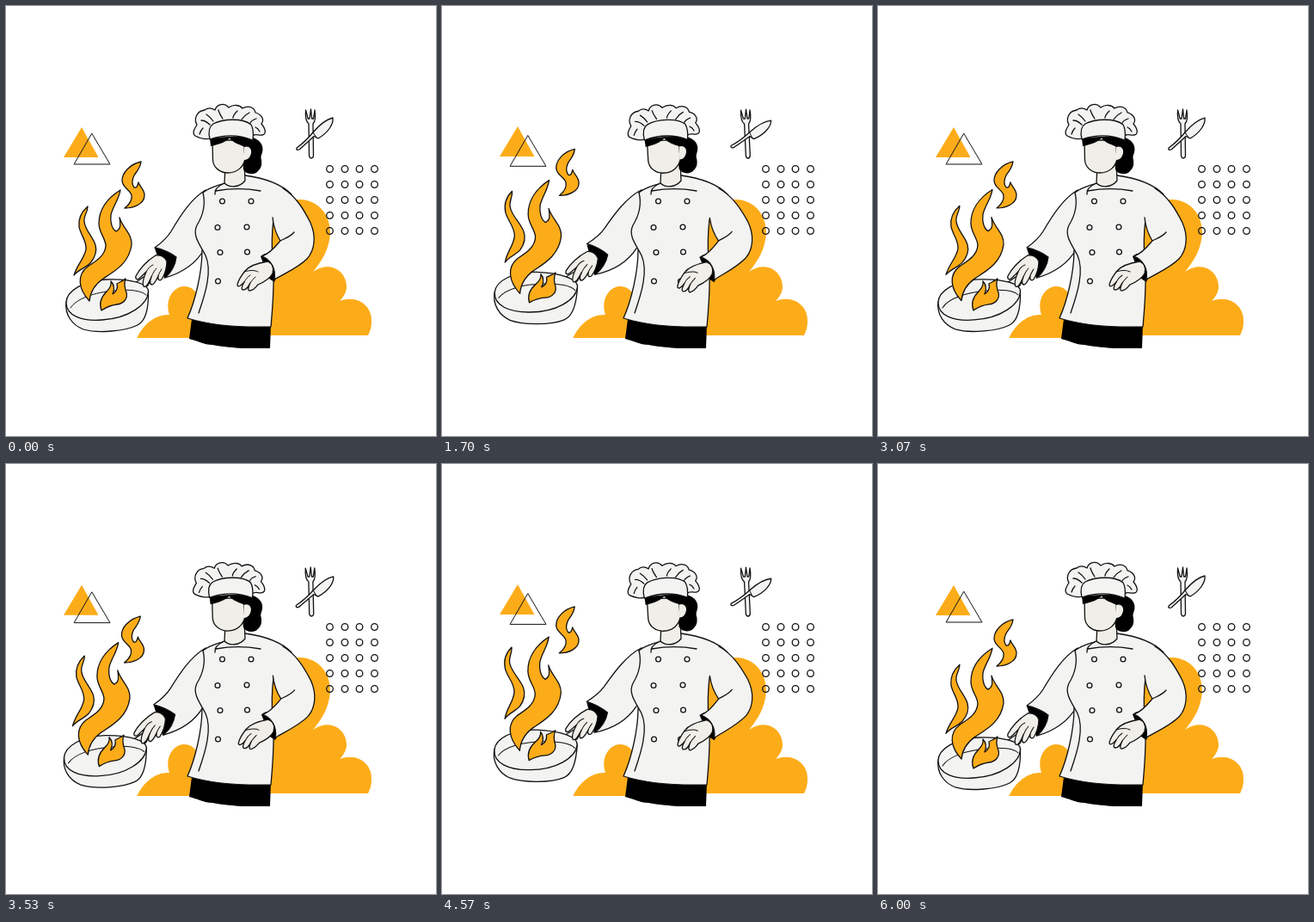
Write an HTML page that moves like this. It is 500 px wide and 500 px high and loops after 6030 ms.

```html
<!DOCTYPE html>
<html lang="en">
<head>
<meta charset="utf-8">
<title>Chef with flaming pan</title>
<style>
html, body { margin: 0; width: 100%; height: 100%; overflow: hidden; background: #fff; }
svg { display: block; width: 100vw; height: 100vh; }
.o { fill: #fdac19; }
.w { fill: #f3f3f2; }
.n { fill: none; }
.skin { fill: #f0eee8; }
.k { fill: #000; }
.l { stroke: #111; stroke-width: 1.3; stroke-linejoin: round; stroke-linecap: round; }
.thin { stroke-width: 1; }
</style>
</head>
<body>
<svg viewBox="0 0 500 500">
  <!-- cloud -->
  <path class="o" d="M152.500 386C158 373 172 358 190 359C184 341 195 326 207 326C216 326 222 332 224 340L300 340L305 245C312 232 326 225 342 225C364 226 377 243 377 264C376 283 367 297 357 309C376 295 397 308 396 328C395 335 391 340 388 343C410 335 426 350 425 367C425 374 423 379 421 383H260V386Z"/>

  <path id="triFill" class="o" d="M88 141L107.500 176H67Z"/>
  <path id="triLine" class="n l thin" d="M100 148.500L121 184H79.500Z"/>
  <g id="dots" class="n l"></g>

  <g id="fork">
    <path class="w l" d="M348.500 121C348 128 348 134 352 137L352.500 174C353 178 357 178 357.500 174L357 137C360 134 360 128 359 121L357.500 131H355.700L354.500 120L353 131H351.200Z"/>
  </g>
  <g id="knife">
    <path class="w l" d="M338 165C345 160 352 153 357 147C363 140 371 132 380 130C381 137 375 147 363 154L358 151.500C353 156 347 162 341 167C339 168 337 167 338 165Z"/>
    <path class="n l thin" d="M357 147L361 153"/>
  </g>

  <!-- trousers -->
  <path class="k" d="M216 364L213 387C222 389 230 394 240 394C255 397 265 397 274 398L307 398L308 370Z"/>

  <!-- pan arm -->
  <g id="panArm">
    <path class="w l" d="M150 322L163 313L170 314L165 325L156 331Z"/>
    <path class="w l" d="M70 344C68 359 77 371 90 376C107 381 139 378 153 371C163 366 166 350 165.500 331Z"/>
    <path class="w l" d="M70 345C70 331 91 319 117 318C146 317 166 323 165.500 332C165 347 143 363 112 365C88 367 70 360 70 345Z"/>
    <path class="n l thin" d="M75 351C82 340 103 333 126 331C144 329 158 331 163 336"/>
    <path class="o l" d="M111 354C108 346 111 338 117 332C121 328 123 325 122 320C126 324 126 330 124 335C129 332 130 327 129 323C132 321 136 320 139 317C137 323 138 328 140 333C142 340 137 346 129 347C121 348 117 350 111 354Z"/>
  </g>
  <path id="flameBig" class="o l" d="M133 214C117 224 108 238 108 253C108 264 116 270 116 279C115 291 104 297 95 303C82 313 84 329 97 343C98 332 103 324 113 317C127 308 143 299 146 278C147 265 136 259 132 246C133 254 134 259 128 262C123 259 121 251 122 243C124 233 131 226 133 214Z"/>
  <path id="flameLeft" class="o l" d="M95 233C87 240 84 249 85 257C87 267 94 273 93 283C91 294 83 300 79 313C85 306 92 305 98 299C103 293 106 285 104 278C101 268 92 261 91 251C90 244 95 240 95 233Z"/>
  <path id="flameTop" class="o l" d="M157 181C144 184 135 194 135 203C135 211 144 213 146 220C147 227 142 232 138 235C149 235 161 230 161 220C161 213 155 210 154 205C153 209 152 212 149 211C146 207 147 201 149 197C152 192 156 189 157 181Z"/>
  <g id="arm">
    <path class="k" d="M173 282C180 280 193 286 199 292C198 303 192 311 184 317L181 305Z"/>
    <path class="skin l" d="M174 290C164 296 155 306 151 314C150 318 153 319 156 316L163 309C160 316 158 323 160 326C163 328 166 322 169 315C167 320 167 324 170 324C173 323 175 318 177 314C176 318 178 320 181 318C184 313 187 304 187 297C185 292 180 289 174 290Z"/>
    <path class="n l thin" d="M163 309C165 305 168 302 171 301M169 315C171 310 173 307 175 305M177 314C178 310 180 308 181 306"/>
    <path class="w" d="M232 214C215 224 202 245 192 262C187 270 180 276 173 281C182 283 191 287 198 292C197 301 192 310 185 316C206 310 222 298 231 282L246 270L246 220Z"/>
    <path class="n l" d="M232 214C215 224 202 245 192 262C187 270 180 276 173 281C182 283 191 287 198 292C197 301 192 310 185 316C206 310 222 298 231 282"/>
  </g>

  <!-- jacket -->
  <path class="w" d="M229 217C236 211 246 209 254 206L278 197C300 200 320 207 332 219L311 248C309 265 309 282 310 296C313 320 310 350 308 373C275 374 240 372 211 363C220 343 228 310 228 284C223 273 217 264 222 255C230 242 232 229 229 217Z"/>
  <path class="n l" d="M229 217C236 211 246 209 254 206M278 197C300 200 320 207 332 219M311 248C309 265 309 282 310 296C313 320 310 350 308 373C275 374 240 372 211 363C220 343 228 310 228 284"/>
  <path class="n l" d="M254 206C247 209 242 213 243 219M229 217C232 229 230 242 222 255C216 267 226 278 232 290C240 308 232 334 224 357M244 215C260 212 280 212 296 215"/>
  <g id="buttons" class="w l"></g>

  <!-- resting arm -->
  <g id="restArm">
    <path class="k" d="M296 291C305 284 313 288 315 300C316 308 315 316 312 321L306 317Z"/>
    <path class="skin l" d="M304 297C292 299 283 302 278 308C274 313 270 319 269 324C269 328 274 325 277 321C274 326 273 330 276 330C280 330 282 326 284 322C281 328 281 332 284 331C289 330 290 327 293 324C300 321 307 317 310 311C312 304 309 299 304 297Z"/>
    <path class="n l thin" d="M277 321C279 317 281 315 284 313M284 322C286 319 288 317 290 315M277 309C284 307 289 307 293 309"/>
    <path class="w" d="M322 212C338 222 347 238 354 252C361 268 359 284 350 294C340 304 326 310 312 318C314 306 309 296 298 291C308 287 314 279 319 273C314 265 311 256 310 246L300 222Z"/>
    <path class="n l" d="M322 212C338 222 347 238 354 252C361 268 359 284 350 294C340 304 326 310 312 318C314 306 309 296 298 291C308 287 314 279 319 273C314 265 311 256 310 246M319 273C325 270 331 268 335 263"/>
  </g>

  <!-- head -->
  <path class="skin l" d="M255 186L254 206C260 212 272 211 278 203L277 180Z"/>
  <g id="head">
    <path class="k" d="M274 152C284 150 296 155 298 163C300 171 295 173 297 179C298 186 296 189 293 192C289 197 279 196 276 190L274 162Z"/>
    <path class="skin l" d="M240 156L240.500 179C241 188 249 194 258 194C269 194 276 187 278 178Q277 166 277 156Z"/>
    <path class="k" d="M237 153L238 163C248 161 256 158 260 153.500C264 159 271 161 278 164L287 158L286 149Z"/>
    <path class="skin" d="M277 164C282 162 286 166 285 171C284 176 281 179 277 179Z"/>
    <path class="w l" d="M237 154C231 156 224 153 220 151C216 148 219 143 222 138C218 131 222 122 231 121C236 117 240 119 243 121C245 114 254 112 259 118C265 114 272 115 275 119C282 115 289 118 290 124C297 126 301 132 297 137C302 143 303 149 298 150C294 151 290 148 287 151Z"/>
    <path class="w l" d="M237 155C235 146 236 140 241 137C252 131 276 130 285 138C288 143 288 148 287 156C270 149 252 150 237 155Z"/>
    <path class="n l" d="M227 133C231 133 234 135 237 138M233 126C236 128 239 131 241 134M247 121C248 125 250 128 252 131M229 142C227 144 226 146 225 149M269 122C266 125 264 128 264 130M283 124C279 126 276 129 274 132M291 131C288 132 285 134 284 136M290 141C293 142 294 144 295 146"/>
  </g>
</svg>
<script>
const NS = 'http://www.w3.org/2000/svg';
const LOOP = 6030;
const LEAD = 0.47; // flames rise slightly ahead of the pan
const $ = id => document.getElementById(id);

function circle(parent, x, y, r) {
  const c = document.createElementNS(NS, 'circle');
  c.setAttribute('cx', x);
  c.setAttribute('cy', y);
  c.setAttribute('r', r);
  parent.append(c);
}

for (const y of [189.5, 207.5, 225.5, 243.5, 261.5])
  for (const x of [376.5, 394, 411, 428.5]) circle($('dots'), x, y, 3.8);

for (const [x, y] of [[251.5, 227], [285, 227], [246, 257.5], [280, 257],
  [249, 286.5], [280.5, 286], [246.5, 320], [277.5, 320]]) circle($('buttons'), x, y, 2.9);

const set = (id, value) => $(id).setAttribute('transform', value);
const turn = (id, deg, x, y) => set(id, `rotate(${deg} ${x} ${y})`);
const shift = (id, x, y) => set(id, `translate(${x} ${y})`);

// Moves the top and the base of a shape by different amounts.
function warp(id, top, base, dTop, dBase) {
  const kx = (dTop[0] - dBase[0]) / (top - base);
  const ky = (dTop[1] - dBase[1]) / (top - base);
  set(id, `matrix(1 0 ${kx} ${1 + ky} ${dBase[0] - kx * base} ${dBase[1] - ky * base})`);
}

function draw(now) {
  const a = (now % LOOP) / LOOP * 4 * Math.PI; // two sways per loop
  const sway = 1 - Math.cos(a);
  const rise = Math.cos(LEAD) - Math.cos(a + LEAD);

  turn('panArm', 2.1 * sway, 235, 215);
  turn('arm', 2.1 * sway, 235, 215);
  turn('restArm', -1.3 * sway, 322, 215);
  turn('head', -1.05 * sway, 265, 200);
  turn('knife', 4 * sway, 358, 151);
  turn('fork', -sway, 355, 150);
  shift('triFill', 0, -0.5 * sway);
  shift('triLine', 0, 1.2 * sway);

  warp('flameBig', 214, 343, [-4.4 * sway, -7.4 * rise], [-3.3 * sway, -5.6 * rise]);
  warp('flameLeft', 233, 313, [-7 * sway, -11.5 * rise], [-3 * sway, -9.7 * rise]);
  warp('flameTop', 181, 236, [-1.4 * sway, -7.6 * sway], [-0.8 * sway, -7.6 * sway]);
}

const start = performance.now();
function tick() {
  draw(performance.now() - start);
  requestAnimationFrame(tick);
}
tick();
</script>
</body>
</html>
```
